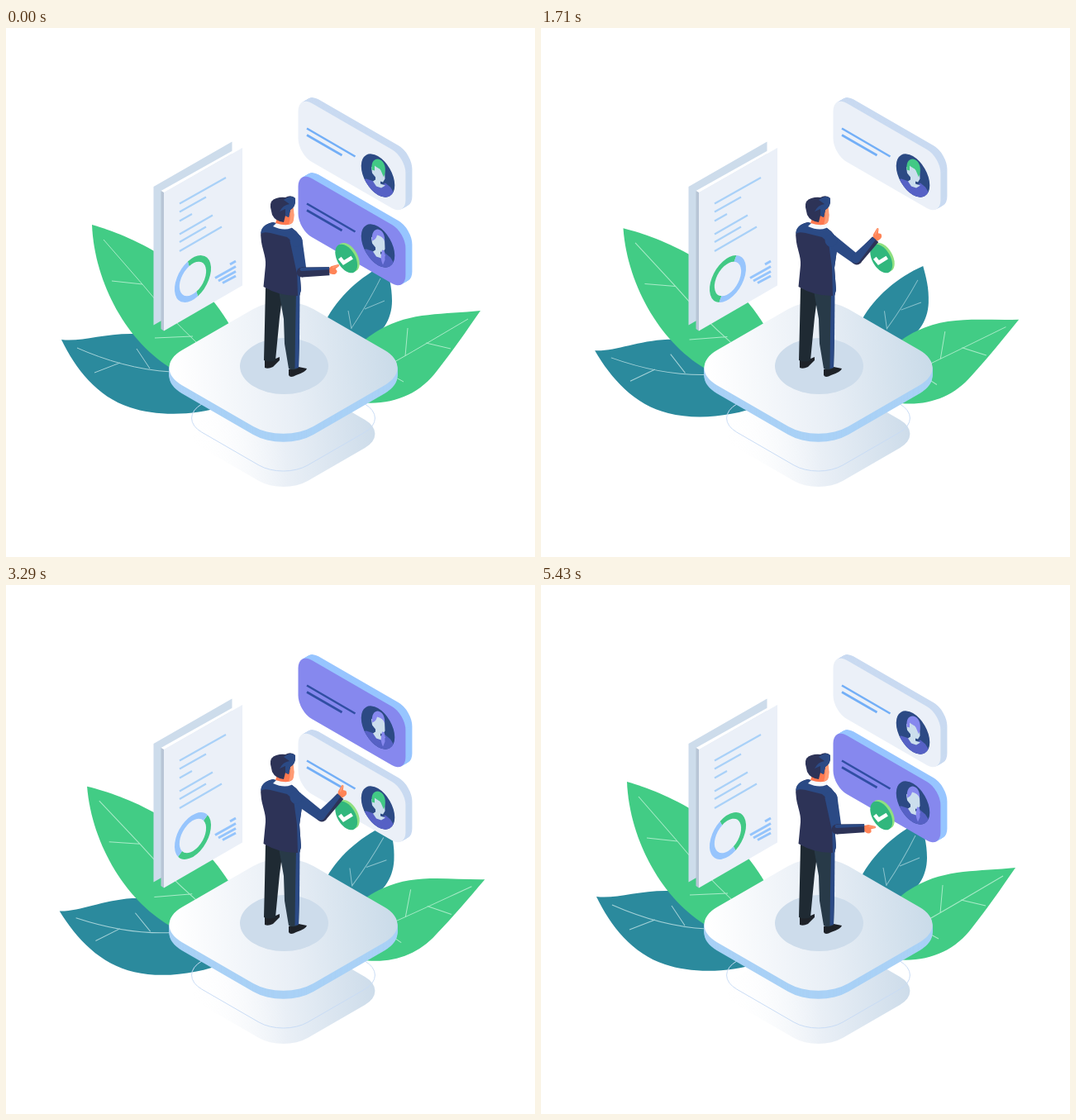
Write an HTML page with a canvas that moves like this. It is 640 by 640 pixels and loops after 5.5 s.

```html
<!DOCTYPE html>
<html lang="en">
<head>
<meta charset="utf-8">
<title>Choosing a candidate</title>
<style>
html, body { margin: 0; width: 100%; height: 100%; overflow: hidden; background: #fff; }
canvas { display: block; width: 640px; height: 640px; }
</style>
</head>
<body>
<canvas id="stage" width="640" height="640"></canvas>
<script>
const LOOP = 5500, STEPS = 77;
const stage = document.getElementById('stage').getContext('2d');
const layer = document.createElement('canvas');
layer.width = layer.height = 640;
const layerCtx = layer.getContext('2d');
let g = stage;

const NAVY = '#2b4a85', INK = '#2d3357', GREEN = '#42cc85', TEAL = '#2b8a9d';
const PALE = '#cddceb', SKIN = '#ff8457', LILAC = '#8688ee';
const LIGHT = { face: '#ebf0f8', side: '#c9daf1', line: '#73aff7' };
const VIOLET = { face: LILAC, side: '#97c5ff', line: '#304ea3' };

const rad = d => d * Math.PI / 180;
const clamp = x => Math.min(1, Math.max(0, x));
const lerp = (a, b, k) => a + (b - a) * k;
const span = (t, from, length) => clamp((t - from) / length);
const ease = p => (1 - Math.cos(Math.PI * p)) / 2;

function fill(d, color) {
  g.fillStyle = color;
  g.fill(new Path2D(d));
}

function line(d, color, width, cap = 'butt') {
  g.strokeStyle = color;
  g.lineWidth = width;
  g.lineCap = cap;
  g.stroke(new Path2D(d));
}

// Round-cornered square lying on the floor; leaves the path current.
function floorPath(x, y, half, r) {
  g.save();
  g.transform(.866, .5, -.866, .5, x, y);
  g.beginPath();
  g.roundRect(-half, -half, half * 2, half * 2, r);
  g.restore();
}

// Disc on a wall that runs down to the right.
function wallDisc(x, y, r) {
  g.save();
  g.transform(.866, .5, 0, 1, x, y);
  g.beginPath();
  g.arc(0, 0, r, 0, Math.PI * 2);
  g.restore();
}

function fade(x0, y0, x1, y1, ...stops) {
  const grad = g.createLinearGradient(x0, y0, x1, y1);
  stops.forEach((c, i) => grad.addColorStop(i / (stops.length - 1), c));
  return grad;
}

// Paints a group as one translucent, shifted sheet.
function sheet(alpha, dx, dy, paint) {
  g = layerCtx;
  g.clearRect(0, 0, 640, 640);
  g.save();
  g.translate(dx, dy);
  paint();
  g.restore();
  g = stage;
  g.globalAlpha = alpha;
  g.drawImage(layer, 0, 0);
  g.globalAlpha = 1;
}

function leaf(x, y, angle, color, body, veins, veinColor) {
  g.save();
  g.translate(x, y);
  g.rotate(angle);
  g.translate(-x, -y);
  fill(body, color);
  line(veins, veinColor, 1);
  g.restore();
}

function backLeaf(sway) {
  leaf(405, 380, .055 * sway, TEAL,
    'M458.7 286C428 301 402 325 387 354L405 385 432 380C455 373 467 352 467 330C467 312 463 300 458.7 286Z',
    'M453 303C442 325 430 345 418 363M458 330L434 340M414 342L418 364', '#8cc3cd');
}

function frontLeaves(sway) {
  leaf(248, 409, -.106 * sway, TEAL,
    'M67 377C92 380 118 369 156 370C188 371 222 395 250 418L262 458C228 469 182 470 150 459C110 446 84 412 67 377Z',
    'M86 387C120 402 160 414 200 416M107 417L138 405M158 388L174 412', '#a5d2d8');
  leaf(245, 392, -.043 * sway, GREEN,
    'M104 238C150 251 228 285 271 360L240 402 202 413C148 382 107 310 104 238Z',
    'M118 256L165 310Q196 348 230 380M128 306L165 310M180 375L226 373', '#a9ebc8');
  leaf(434, 402, .11 * sway, GREEN,
    'M574 342C530 347 490 343 452 365C438 373 430 380 424 390L428 453C466 457 500 444 522 414C541 390 556 368 574 342Z',
    'M559 352C530 369 500 387 470 404M486 363L483 397M538 388L508 381M470 422L481 428', '#a9ebc8');
}

function platform() {
  floorPath(335.5, 491, 74, 34);
  g.fillStyle = fade(225, 500, 446, 480, 'rgba(255,255,255,0)', '#e9eff6', '#cddcea');
  g.fill();
  floorPath(335.5, 472, 74, 34);
  g.strokeStyle = '#c9dcf5';
  g.lineWidth = 1;
  g.stroke();

  g.fillStyle = '#a9d1f6';
  for (let dy = 10; dy > 0; dy--) {
    floorPath(335.5, 411 + dy, 92, 42);
    g.fill();
  }
  floorPath(335.5, 411, 92, 42);
  g.fillStyle = fade(205, 425, 470, 395, '#ffffff', '#e9eff6', '#cadbe9');
  g.fill();

  g.beginPath();
  g.ellipse(336.5, 409, 53.5, 34, 0, 0, Math.PI * 2);
  g.fillStyle = PALE;
  g.fill();
}

function report(t) {
  fill('M178.5 192L273.5 137.5V305L178.5 359.5Z', PALE);
  fill('M187.5 197L283 143.5 286 145 191 199.5Z', '#ffffff');
  fill('M187.5 197L191 199V366.5L187.5 364Z', '#b8c5d6');
  fill('M191 199L286 145V311.5L191 366.5Z', '#ebf0f8');
  line('M210 212.5L266 181M210 222.5L242 204.5M210 233.5L225 225M210 249.5L250 226.5M210 259L242 240.5M210 270L261 240.5',
    '#a9d1f8', 2.2);
  line('M271 286L278 282M253 302.5L278 288.5M257 306L278 294.5M262 308.5L278 300', '#94c4fc', 3);

  // Chart ring, turning twice per loop
  const start = rad(-106 + 720 * t / LOOP);
  g.save();
  g.transform(.866, -.5, 0, 1, 226, 303.5);
  g.lineWidth = 6.8;
  g.lineCap = 'butt';
  ['#42c985', '#97c5fd'].forEach((color, i) => {
    g.beginPath();
    g.arc(0, 0, 22, start + i * Math.PI, start + (i + 1) * Math.PI);
    g.strokeStyle = color;
    g.stroke();
  });
  g.restore();
}

function avatar(y, hair, long) {
  g.save();
  wallDisc(450, y, 23.4);
  g.fillStyle = '#2c4a84';
  g.fill();
  g.clip();
  g.translate(450, y);
  fill('M-21 5L-14 4 -5 7 3 13 9 9 15 14 22 25V32H-21Z', '#5661c5');
  fill('M-8 -10L0 -16 8 -8 8.5 4 6 8 3 7 3 10 9 12 4 15 -2 13 -6 7 -3 5 -3 2 -7 -3Z', '#cbdeed');
  if (long) {
    fill('M-7 -6C-8 -15 -5 -20 0 -20C6 -19 9 -12 8 -5C7 -10 3 -12 -1 -13C-2 -9 -4 -7 -7 -6Z', hair);
    fill('M5 5C10 5 8 12 8.5 17L6 23C4 19 3 14 4 10Z', hair);
  } else {
    fill('M-7.5 -7C-8 -15 -6 -20 0 -20C7 -19 10 -11 8.5 -3L7 2 4 -5C3 -9 -1 -9 -4 -12L-4 -6Z', hair);
  }
  g.restore();
}

function panel({ face, side, line: ink }) {
  for (let i = 8; i >= 0; i--) {
    g.save();
    g.transform(.866, .5, 0, 1, 353.5 + i, 81.5 - i * .58);
    g.beginPath();
    g.roundRect(0, 0, 150, 71, 19);
    g.fillStyle = i ? side : face;
    g.fill();
    g.restore();
  }
  line('M364 121.5L422.5 155.5M364 129.5L406.5 154', ink, 2.6);
}

// The portrait stays stronger than the panel while a card fades.
function card({ dx = 0, dy = 0, alpha, style, hair }) {
  if (alpha <= 0) return;
  const long = style === VIOLET;
  sheet(alpha, dx, dy, () => panel(style));
  sheet(Math.sqrt(alpha), dx, dy, () => avatar(long ? 172.5 : 178.5, hair, long));
}

function cards(t) {
  const left = ease(span(t, 1140, 600));
  const right = ease(span(t, 3480, 760));
  const drop1 = ease(span(t, 1965, 1030));
  const drop2 = ease(span(t, 4260, 1030));

  card({ dx: -155 * left, dy: 91 - 91 * left, alpha: 1 - span(t, 1390, 280), style: VIOLET, hair: LILAC });
  card({ dx: 153 * right, dy: 91 * drop1 + 88 * right, alpha: 1 - span(t, 3890, 280), style: LIGHT, hair: '#42c985' });
  card({ dy: -85 * (1 - drop1) + 91 * drop2, alpha: drop1, style: VIOLET, hair: LILAC });
  card({ dy: -85 * (1 - drop2), alpha: drop2, style: LIGHT, hair: LILAC });
}

function badge() {
  wallDisc(414.3, 277.3, 15.5);
  g.fillStyle = '#8fe080';
  g.fill();
  wallDisc(411.7, 279, 15.5);
  g.fillStyle = '#31b77d';
  g.fill();
  line('M403.8 278.3L408.4 284 418.7 277.6', '#ffffff', 4.6);
}

function body() {
  // Legs and shoes
  fill('M313 402L324 401 331 398 331 402 323 410Q317 413 313 411Z', '#1e2228');
  fill('M342 413L354 410 364 412Q363 416 351 420Q344 424 342 420Z', '#1e2228');
  fill('M314 314L335 320 331 350 326 402Q318 405 312 402L313 360Z', '#1f2a33');
  fill('M330 318L355 320 355 375 354 411Q348 415 342 412L337 382 336 352Z', '#283a48');
  fill('M351 320L355.5 319 355 375 354 411 349.5 412 350 370Z', NAVY);

  // Jacket
  fill('M323 235C312 237 307 244 308.5 254C309 266 315 276 314 287L311.5 313Q332 325 355 324L357 317 355 290 359 262Q358 250 346 242Z', INK);
  fill('M323 235C312 237 308 243 308.5 249Q311 246 320 248L340 253 348 260 352 290 353 324 355 324 357 317 355 290 359 262Q358 250 346 242Z', NAVY);
  fill('M323 240L329 234 341 239 348 236 345 242Q336 246 323 240Z', '#f5f7fc');

  // Head
  fill('M328 230L346 214Q350 227 347 235Q342 241 326 236Z', '#ff7950');
  fill('M343 219L347 214Q350 227 347 235L342 238Q345 229 343 219Z', '#ff9b74');
  fill('M320 217Q319 208 327 206Q333 204 338 205Q345 201 350 206Q351 216 344 220L342 229 338 227 336 235Q326 234 322 226Z', INK);
  fill('M336 208Q345 201 350 206Q351 216 344 220L342 229 338 227 338 219 331 222Q335 214 343 213Z', NAVY);
}

function limb(a, b, wa, wb, color) {
  const angle = Math.atan2(b.y - a.y, b.x - a.x);
  const nx = -Math.sin(angle) / 2, ny = Math.cos(angle) / 2;
  g.fillStyle = color;
  g.beginPath();
  g.moveTo(a.x + nx * wa, a.y + ny * wa);
  g.lineTo(b.x + nx * wb, b.y + ny * wb);
  g.lineTo(b.x - nx * wb, b.y - ny * wb);
  g.lineTo(a.x - nx * wa, a.y - ny * wa);
  g.fill();
  g.beginPath();
  g.arc(a.x, a.y, wa / 2, 0, Math.PI * 2);
  g.fill();
}

const reach = (p, length, deg) => ({
  x: p.x + length * Math.cos(rad(deg)),
  y: p.y + length * Math.sin(rad(deg))
});

function armLift(t) {
  if (t < 2500) return ease(span(t, 1090, 650)) - ease(span(t, 1740, 410));
  return ease(span(t, 2800, 480)) - ease(span(t, 3480, 640));
}

function arm(t) {
  const lift = armLift(t);
  const shoulder = { x: 351, y: 257 };
  const elbow = reach(shoulder, 39, 80 - 43 * lift);
  const aim = -2 - 46 * lift;
  const cuff = reach(elbow, 33.5, aim);
  const point = lerp(t < 3290 ? -32 : -4, -77, lift);

  // Hand
  g.save();
  g.translate(cuff.x, cuff.y);
  g.rotate(rad(point));
  fill('M-1 -3L5 -4 13 -1.5Q15 0 13 1L8 1.5 8 5Q5 8 1.5 5.5L-1 3Z', SKIN);
  line('M6 -1.5L13 -.2', '#ff9b74', 1.6, 'round');
  g.restore();

  limb(shoulder, elbow, 15, 12, NAVY);
  limb(elbow, cuff, 12, 10, INK);
  const shade = lerp(1.5, 3, lift);
  const up = p => reach(p, 5 - shade, aim - 90);
  limb(up(elbow), up(cuff), 7 * lift + 4, 3 + lift * 2, NAVY);
}

function draw(t) {
  g.clearRect(0, 0, 640, 640);
  const sway = (1 - Math.cos(2 * Math.PI * t / LOOP)) / 2;
  backLeaf(sway);
  cards(t);
  frontLeaves(sway);
  platform();
  report(t);
  body();
  badge();
  arm(t);
}

const began = performance.now();
function tick() {
  const t = (performance.now() - began) % LOOP;
  const step = Math.floor((t + 6) * STEPS / LOOP) % STEPS;
  draw(step * LOOP / STEPS);
  requestAnimationFrame(tick);
}
tick();
</script>
</body>
</html>
```
